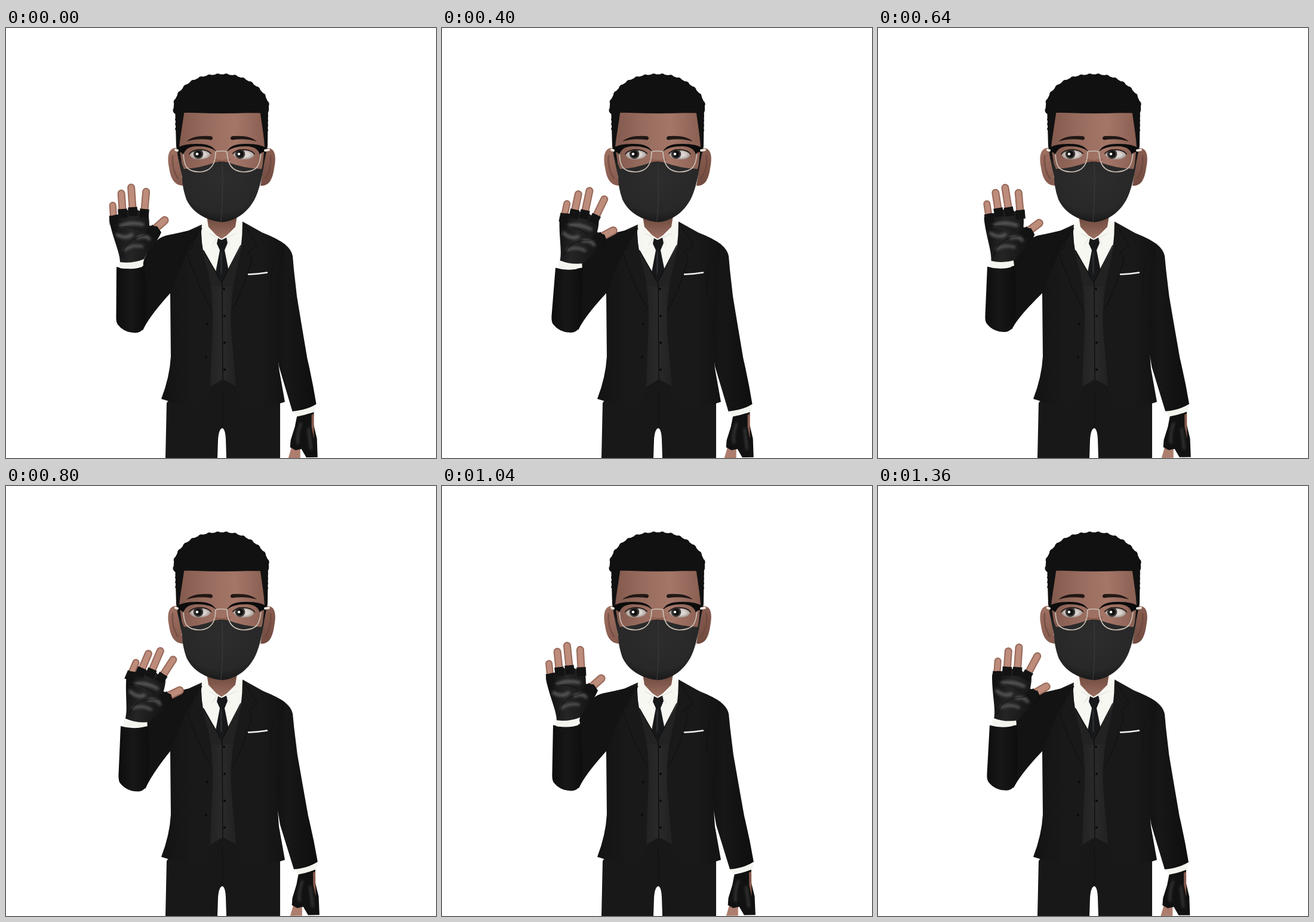
An HTML page for the animation above (1440 ms loop, 720 px wide and 720 px high).

```html
<!DOCTYPE html>
<html lang="en">
<head>
<meta charset="utf-8">
<title>Waving avatar</title>
<style>
html, body { margin: 0; width: 100%; height: 100%; overflow: hidden; background: #fff; }
svg { display: block; width: 100vw; height: 100vh; }
.line { fill: none; stroke-linecap: round; stroke-linejoin: round; }
</style>
</head>
<body>
<svg viewBox="0 0 720 720">
  <defs>
    <linearGradient id="suit"><stop stop-color="#131313"/><stop offset=".25" stop-color="#191919"/><stop offset=".8" stop-color="#191919"/><stop offset="1" stop-color="#131313"/></linearGradient>
    <linearGradient id="sleeve"><stop stop-color="#0d0d0d"/><stop offset=".45" stop-color="#171717"/><stop offset="1" stop-color="#0e0e0e"/></linearGradient>
    <linearGradient id="vest"><stop stop-color="#1e1e1e"/><stop offset=".5" stop-color="#2a2a2a"/><stop offset="1" stop-color="#1e1e1e"/></linearGradient>
    <linearGradient id="skin"><stop stop-color="#835a4e"/><stop offset=".3" stop-color="#966b5d"/><stop offset=".65" stop-color="#a47668"/><stop offset="1" stop-color="#8a6053"/></linearGradient>
    <linearGradient id="neck" x2="0" y2="1"><stop stop-color="#6a473b"/><stop offset="1" stop-color="#9c6f61"/></linearGradient>
    <linearGradient id="ear" x2="1" y2="1"><stop stop-color="#a07163"/><stop offset="1" stop-color="#70493e"/></linearGradient>
    <linearGradient id="glove"><stop stop-color="#0e0e0e"/><stop offset=".4" stop-color="#252525"/><stop offset="1" stop-color="#0f0f0f"/></linearGradient>
    <radialGradient id="mask" cx=".5" cy=".4" r=".6"><stop stop-color="#2d2d2d"/><stop offset=".75" stop-color="#282828"/><stop offset="1" stop-color="#1a1a1a"/></radialGradient>
    <radialGradient id="white"><stop offset=".5" stop-color="#dcd6d3"/><stop offset="1" stop-color="#a39893"/></radialGradient>
    <filter id="soft" x="-50%" y="-50%" width="200%" height="200%"><feGaussianBlur stdDeviation="2.2"/></filter>
    <path id="eyeball" d="M-18 0C-12-9 10-10 18-1C17 6 8 9-2 9C-11 9-16 6-18 0Z" fill="url(#white)"/>
    <g id="iris">
      <circle r="8.3" fill="#3a3837"/><circle r="5.5" fill="#101010"/>
      <circle cx="-2" r="2.3" fill="#fff"/>
    </g>
    <path id="lid" class="line" d="M-18 0C-12-9 10-10 18-1" stroke="#2b1e1a" stroke-width="2"/>
  </defs>

  <!-- resting arm -->
  <g id="rest">
    <path d="M478 700L472 720H492L492 704Z" fill="#ad7d6d"/>
    <path d="M487 648L515 643L514 662L520 688L521 719H502L494 705L484 707L475 702L476 690L483 668Z" fill="#111"/>
    <path d="M511 648L515 646V688L511 668Z" fill="#875b4d"/>
    <path class="line" d="M493 662Q486 680 488 695M506 671L510 705" stroke="#666" stroke-width="3" opacity=".6" filter="url(#soft)"/>
    <path d="M480 640L519 630L517 642Q503 648 485 651Z" fill="#f4f4ef"/>
    <path d="M430 343C458 354 477 365 480 382L482 405L487 450L496 505L504 553Q513 592 519 630Q503 640 479 642L457 568L436 440Z" fill="url(#sleeve)"/>
  </g>

  <!-- trousers, neck, shirt, vest -->
  <path d="M269 628L300 580H430L459 628V720H369L368 688Q367 671 362 670Q356 672 355 690L354 720H267Z" fill="#181818"/>
  <path class="line" d="M362 606Q364 640 362 668" stroke="#121212" stroke-width="1.5"/>
  <path d="M330 372L394 362L387 601L363 588L340 602Z" fill="url(#vest)"/>
  <path d="M328 328L337 322H387L396 328L394 366L363 426L331 374Z" fill="#f7f7f2"/>
  <path d="M336 314H387L384 333L370 347L361 353L352 347L339 333Z" fill="url(#neck)"/>
  <path class="line" d="M340 344L353 351L346 363M385 344L369 351L375 363" stroke="#dcdcd5" stroke-width="1"/>
  <path d="M355 352L361 355L369 351L371 360L366 372L373 407L362 425L351 409L358 372L353 361Z" fill="#17181a"/>
  <path class="line" d="M361 376L360 410" stroke="#45464a" stroke-width="4" opacity=".7" filter="url(#soft)"/>
  <path d="M330 371L361 426L394 364L391 430L363 434L338 430Z" fill="#222"/>
  <path class="line" d="M331 373L361 426L393 364M362 427L363 588" stroke="#0f0f0f" stroke-width="1.5"/>
  <path class="line" d="M365 437V437M366 482V482M366 527V527M366 572V572" stroke="#090909" stroke-width="4"/>

  <!-- jacket -->
  <path d="M328 329L327 342Q328 375 339 410Q349 455 345 520L342 597Q338 628 323 634L296 632L260 621Q274 585 276 550L275 445L262 380L270 348L306 339Z
    M396 324L430 343L467 362L452 500L457 570L467 626Q440 636 404 635Q390 631 385 598L378 520Q373 460 385 410Q396 370 396 324Z" fill="url(#suit)"/>
  <path class="line" d="M306 340L313 367L302 374Q320 430 344 470M397 326L421 365L405 375L412 384Q398 440 378 472M444 450Q440 420 449 390" stroke="#111" stroke-width="1.2"/>
  <path class="line" d="M337 496V496M335 551V551" stroke="#0a0a0a" stroke-width="4"/>
  <path class="line" d="M406 412.5Q422 412 437 409.5" stroke="#f1f1f1" stroke-width="2.6"/>

  <!-- head -->
  <path d="M287 201C272 199 269 215 273 234C276 254 283 264 297 264ZM436 201C451 200 453 214 449 235C446 256 439 265 426 264Z" fill="url(#ear)"/>
  <path class="line" d="M279 214Q277 236 288 252M443 214Q445 236 434 252" stroke="#68443a" stroke-width="3" opacity=".55"/>
  <path d="M283 130H439L438 198L428 245H295L285 198Z" fill="#111"/>
  <path d="M299 135H425C428 160 432 180 433 200L428 245H297L290 200C292 180 296 160 299 135Z" fill="url(#skin)"/>
  <path d="M347 218Q361 224 376 218L372 230H350Z" fill="#895748" opacity=".7"/>
  <path class="line" d="M286 138C284 122 294 109 304 100C320 87 341 82.5 362 82.5C388 82.5 407 93 421 106C432 117 436 128 435 138Q422 137 410 137Q362 139 316 137Q298 136 286 138Z" style="fill:#111" stroke="#111" stroke-width="10"/>
  <path class="line" d="M286 138C284 122 294 109 304 100C320 87 341 82.5 362 82.5C388 82.5 407 93 421 106C432 117 436 128 435 138" stroke="#111" stroke-width="13" stroke-dasharray="0 14"/>
  <path class="line" d="M285 153V172M437 147V172" stroke="#111" stroke-width="4" stroke-dasharray="0 8"/>
  <path d="M302 190Q313 179 343 181Q349 184 344 187.500Q320 184 302 190ZM420 190Q409 179 379 181Q373 184 378 187.500Q402 184 420 190Z" fill="#211815"/>
  <use href="#eyeball" x="325" y="211"/><use href="#iris" x="322" y="211"/><use href="#lid" x="325" y="211"/>
  <use href="#eyeball" transform="translate(398 211) scale(-1 1)"/><use href="#iris" x="392" y="211"/><use href="#lid" transform="translate(398 211) scale(-1 1)"/>
  <path d="M286 207L298 236Q324 235 350 225Q361 222 372 225Q398 235 428 236L435 207Q430 250 422 273C413 302 389 323 362 325C336 323 312 309 302 287Q295 267 295 250Z" fill="url(#mask)"/>
  <path class="line" d="M362 225Q364 280 360 324" stroke="#383838" stroke-width="1.3"/>
  <path class="line" d="M297 207C297 232 303 241 325 241C343 240 351 229 351 207Q361 205 370 207C371 229 379 240 397 241C419 241 426 232 427 207" stroke="#cbc1b6" stroke-width="1.7"/>
  <path d="M285 202Q295 194 318 194Q345 193 352 207Q342 198 320 198Q301 198 297 212Q294 207 286 207ZM437 202Q427 194 404 194Q376 193 370 207Q380 198 402 198Q421 198 425 212Q428 207 436 207Z" fill="#0c0c0c"/>
  <path class="line" d="M284 204L287 205M434 205L440 204" stroke="#eee8df" stroke-width="4"/>

  <!-- waving arm -->
  <path id="upper" fill="#131313"/>
  <path id="fore" fill="url(#sleeve)"/>
  <path id="cuff" d="M-20-5Q0-2 20-6L21 3Q0 9-19 5Z" fill="#f4f4ef"/>
  <g id="fingers" class="line"></g>
  <g id="palm">
    <path d="M-18-4C-18-20-31-46-36-74Q-36-82-27-83L-20-84L-15-91L-6-91L7-94L14-90L27-90Q31-82 31-65L44-64L51-54C44-36 30-26 22-9Q2-1-18-4Z" fill="url(#glove)"/>
    <g class="line" stroke="#868686" filter="url(#soft)" opacity=".6">
      <path d="M-17-65Q0-72 20-67M-23-50Q-9-42 2-50M12-45Q24-50 31-43" stroke-width="5"/>
      <path d="M-10-24Q2-34 19-30" stroke-width="4"/>
    </g>
    <path class="line" d="M-28-61Q-5-67 17-57M-14-12Q-11-38 13-46Q27-47 33-61" stroke="#0b0b0b" stroke-width="1.2" opacity=".6"/>
  </g>
  <g id="stubs" class="line"></g>
</svg>

<script>
const LOOP = 1440, STEP = 80, RAD = Math.PI / 180;
const $ = id => document.getElementById(id);

// time, elbow x, cuff x, palm angle, finger angle, index finger angle
const poses = [
  [0, 211, 209, 0, -4, 5], [80, 209, 207, -1, -8, -1], [160, 207, 214, 6, -9, -5],
  [240, 206, 223, 14, -3, 0], [320, 207, 223, 21, 13, 20], [400, 210, 214, 14, 12, 26],
  [560, 203, 201, 1, -9, 0], [640, 206, 207, 5, -9, -5], [720, 211, 217, 16, 8, 13],
  [800, 215, 216, 16, 23, 33], [880, 208, 206, 6, 8, 25], [960, 204, 199, -5, -7, 5],
  [1040, 211, 210, 0, -6, -3], [1120, 208, 218, 13, -6, -4], [1200, 205, 223, 25, 16, 27],
  [1280, 207, 218, 20, 14, 30], [1360, 209, 211, 12, 4, 28], [LOOP, 211, 209, 0, -4, 5]
];

// knuckle x, y relative to the cuff, visible length, width
const digits = [[-29, -81, 24, 12], [-14, -92, 33, 13], [3, -95, 40, 13], [23, -92, 36, 13], [41, -60, 27, 14]];

function addLine(parent, color, width, cap) {
  const el = document.createElementNS('http://www.w3.org/2000/svg', 'path');
  el.setAttribute('stroke', color);
  el.setAttribute('stroke-width', width);
  el.setAttribute('stroke-linecap', cap);
  return $(parent).appendChild(el);
}

const parts = digits.map(d => ({
  edge: addLine('fingers', '#98695a', d[3], 'round'),
  skin: addLine('fingers', '#bd8c7b', d[3] - 4, 'round'),
  stub: addLine('stubs', '#131313', d[3] + 2.5, 'butt')
}));

function poseAt(t) {
  const i = poses.findIndex(p => p[0] > t), a = poses[i - 1], b = poses[i];
  const k = (t - a[0]) / (b[0] - a[0]);
  return a.map((v, j) => v + (b[j] - v) * k);
}

function draw(t) {
  const [, ex, cx, turn, lean, index] = poseAt(t);
  const cy = 396 + (cx - 209) * .28;
  const low = 508 + (ex - 203) * .3;

  $('upper').setAttribute('d', `M329 335Q300 341 270 347Q246 352 ${ex + 20} 388L${ex} 470L${ex + 18} ${low - 4}Q${ex + 28} 484 275 444L303 375Z`);
  $('fore').setAttribute('d', `M${cx - 24} ${cy + 4}Q${cx} ${cy + 11} ${cx + 22} ${cy + 3}Q${ex + 26} 445 ${ex + 24} ${low - 19}
    Q${ex + 19} ${low} ${ex + 6} ${low}Q${ex - 13} ${low} ${ex - 24} ${low - 14}Q${ex - 27} ${low - 18} ${ex - 26.5} 482Z`);
  $('cuff').setAttribute('transform', `translate(${cx} ${cy}) rotate(${turn * .4 - 3})`);
  $('palm').setAttribute('transform', `translate(${cx} ${cy}) rotate(${turn})`);

  const c = Math.cos(turn * RAD), s = Math.sin(turn * RAD);
  digits.forEach(([x, y, length], i) => {
    const angle = [lean, lean, lean, index, 48 + turn][i] * RAD;
    const bx = cx + x * c - y * s, by = cy + x * s + y * c;
    const at = r => `${bx + Math.sin(angle) * r} ${by - Math.cos(angle) * r}`;
    const finger = `M${at(-3)}L${at(length - 6)}`;
    parts[i].edge.setAttribute('d', finger);
    parts[i].skin.setAttribute('d', finger);
    parts[i].stub.setAttribute('d', `M${at(-14)}L${at(1)}`);
  });

  const sway = 1.7 * (1 - Math.cos((t - 200) / LOOP * 2 * Math.PI));
  $('rest').setAttribute('transform', `rotate(${-sway * .2} 460 370)`);
}

function tick() {
  draw(Math.floor(performance.now() % LOOP / STEP) * STEP);
  requestAnimationFrame(tick);
}
tick();
</script>
</body>
</html>
```
